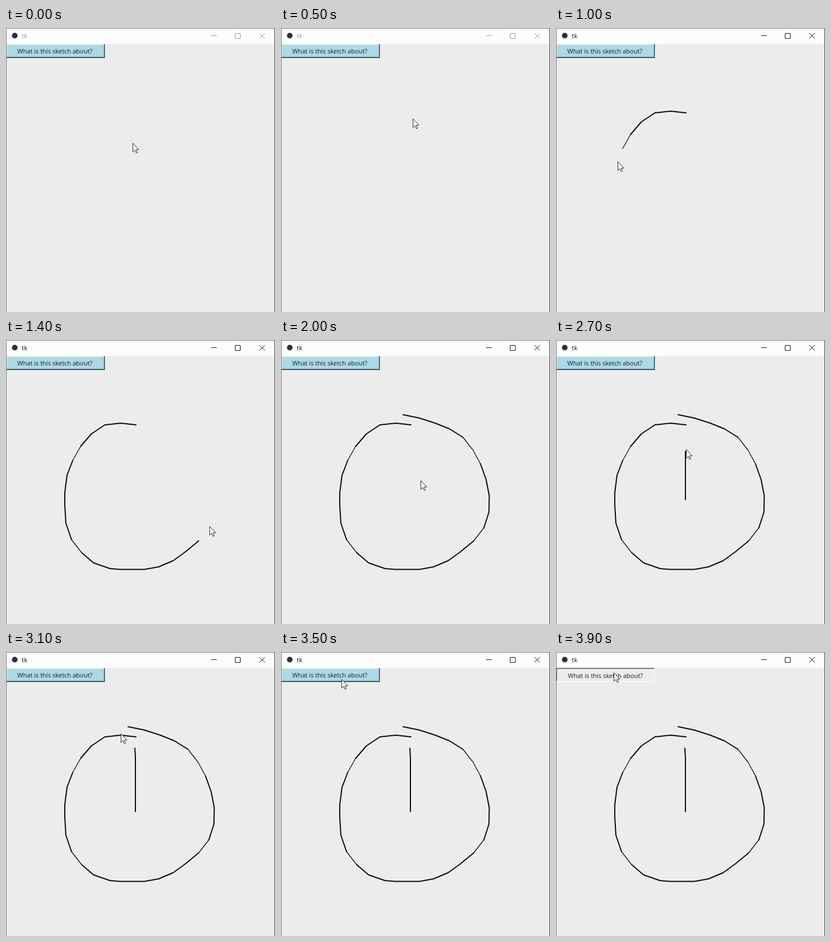
Recreate the animation shown at these times as an HTML page. Size 476 px wide and 502 px high, loop 4 s.

```html
<!DOCTYPE html>
<html lang="en">
<head>
<meta charset="utf-8">
<title>Sketch window</title>
<style>
  html, body { margin: 0; width: 476px; height: 502px; overflow: hidden; background: #ececec; }
  svg { display: block; }
  text { font: 11px "Open Sans", "Noto Sans", sans-serif; }
  #controls { fill: none; stroke: currentColor; }
  #titleBar text { fill: currentColor; }
</style>
</head>
<body>
<svg width="476" height="502" viewBox="0 0 476 502">
  <rect width="476" height="502" fill="#ececec"/>
  <g id="titleBar">
    <rect width="476" height="28" fill="#fdfdfd"/>
    <circle cx="15.5" cy="13.5" r="5" fill="#27343f"/>
    <text x="28" y="18">tk</text>
    <path id="controls" d="M363 13.5h10M405.5 9.5h9v9h-9zM448.5 9l9.5 9.500M458 9l-9.500 9.500"/>
  </g>
  <g id="button">
    <rect id="face" y="28" width="175" height="25"/>
    <path id="lit" d="M0 53V28H175L173 30H2V51Z"/>
    <path id="shade" d="M0 53H175V28L173.500 29.500V51.300H1.700Z"/>
    <text id="label" x="20" y="45" fill="#1b2226">What is this sketch about?</text>
  </g>
  <path d="M0 .5H476" stroke="#777"/>
  <path d="M.5 0V502" stroke="#777"/>
  <path d="M475.500 0V502" stroke="#444"/>
  <g fill="none" stroke="#0a0a0a" stroke-linecap="round">
    <path id="bold" stroke-width="2"/>
    <path id="fine" stroke-width="1.3"/>
  </g>
  <path id="cursor" d="M.5 .5V16L4 12.700L6.500 18L8.700 17L6.300 11.800H11Z" fill="#fafafa" stroke="#2a2a2a"/>
</svg>
<script>
const $ = id => document.getElementById(id);
const STEP = 100, STEPS = 40;

const circle = [
  [230,150], [203,147], [175,150], [151,166], [132,188], [118,213], [108,239], [104,270],
  [104,292], [106,324], [116,353], [134,376], [155,394], [184,404], [201,405.5], [245,405.5],
  [270,401], [296,390], [318,374], [341,355], [359,332], [368,304], [368.5,275], [363,247],
  [353,219], [340,195], [322,172], [298,157], [273,147], [245,138], [216,132]
];
const last = circle.length - 1;

// Cursor way-points outside the circle stroke: [step, x, y]
const approach = [[0,224,203], [3,236,178], [6,231,151]];
const afterwards = [
  [17,217,130], [18,224,168], [20,247,248], [22,233,290], [24,229,282],
  [27,230,193], [28,227,168], [30,227,168], [35,107,48], [36,102,36]
];

function along(keys, step) {
  const i = keys.findIndex(k => k[0] >= step);
  if (i < 0) return keys[keys.length - 1].slice(1);
  if (i === 0) return keys[0].slice(1);
  const [s0, x0, y0] = keys[i - 1], [s1, x1, y1] = keys[i];
  const p = (step - s0) / (s1 - s0);
  return [x0 + (x1 - x0) * p, y0 + (y1 - y0) * p];
}

// The pen starts slowly, then speeds up
const penIndex = step =>
  Math.min(last, Math.round(step < 10 ? 2 * (step - 7) : 6 + 3.5 * (step - 10)));

function cursorAt(step) {
  if (step < 7) return along(approach, step);
  if (step >= 17) return along(afterwards, step);
  const [x, y] = circle[penIndex(step)];
  return [x + 1, y - 3];
}

function drawStrokes(step, cursorY) {
  const paths = { bold: "", fine: "" };
  const line = ([x0, y0], [x1, y1]) => {
    const slope = Math.abs((y1 - y0) / (x1 - x0));
    paths[slope > 1.2 && slope < 2 ? "fine" : "bold"] += `M${x0} ${y0}L${x1} ${y1}`;
  };
  const end = step >= 18 ? last : penIndex(step) - 1;
  for (let i = 1; i <= end; i++) line(circle[i - 1], circle[i]);
  if (step > 24) {
    const tip = step < 28 ? cursorY + 4 : 170;
    line([229, 282], [229, Math.max(tip, 187)]);
    if (tip < 187) line([229, 187], [228, tip]);
  }
  for (const id in paths) $(id).setAttribute("d", paths[id]);
}

function drawButton(pressed) {
  $("face").setAttribute("fill", pressed ? "#ececec" : "#add8e6");
  $("lit").setAttribute("fill", pressed ? "#77797c" : "#d9edf4");
  $("shade").setAttribute("fill", pressed ? "#fafafa" : "#34434a");
  $("label").setAttribute("transform", pressed ? "translate(1 1)" : "");
}

function render() {
  const step = Math.floor(performance.now() / STEP) % STEPS;
  const [x, y] = cursorAt(step);
  $("titleBar").style.color = step < 7 ? "#999" : "#111";
  $("cursor").setAttribute("transform", `translate(${Math.round(x)} ${Math.round(y)})`);
  drawStrokes(step, y);
  drawButton(step >= 37);
  requestAnimationFrame(render);
}
render();
</script>
</body>
</html>
```
